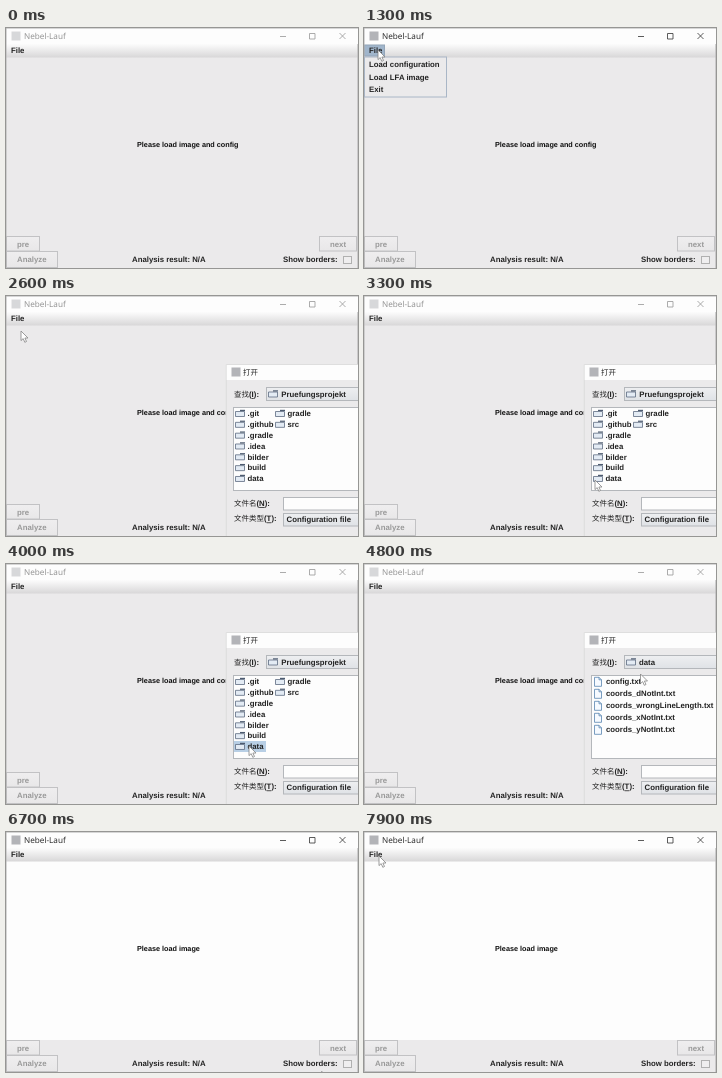
An HTML page that plays this animation: 352 by 240 pixels, repeating every 8000 ms.

```html
<!DOCTYPE html>
<html lang="en">
<head>
<meta charset="utf-8">
<title>Nebel-Lauf</title>
<style>
  html, body { margin: 0; width: 100%; height: 100%; overflow: hidden; background: #ebeaeb; }
  svg { display: block; width: 100vw; height: 100vh; }
  text { font: bold 7.8px "Liberation Sans", "Noto Sans CJK SC", "Noto Sans CJK", sans-serif;
         fill: #222; text-rendering: geometricPrecision; white-space: pre; }
  .title { font: 8.2px "Open Sans", "Noto Sans", sans-serif; }
  .label { font-size: 7.25px; fill: #111; }
  .off { fill: #999; }
  .plain { font-weight: normal; }
  .cjk { font: 500 7.5px "Noto Sans CJK SC", "Noto Sans CJK", sans-serif; }
</style>
</head>
<body>
<svg id="stage" viewBox="0 0 352 240" xmlns="http://www.w3.org/2000/svg"></svg>
<script>
const LOOP = 8000, STEP = 100;
const FACE = '#ebeaeb', BORDER = '#b4b7bb', SELECT = '#a0b5cb', ROW = '#b8cfe5';

const rect = (x, y, w, h, fill, stroke = 'none', extra = '') =>
  `<rect x="${x}" y="${y}" width="${w}" height="${h}" fill="${fill}" stroke="${stroke}" ${extra}/>`;
const text = (x, y, s, cls = '', extra = '') => `<text x="${x}" y="${y}" class="${cls}" ${extra}>${s}</text>`;
const path = (d, fill, stroke, width = 0.8) =>
  `<path d="${d}" fill="${fill}" stroke="${stroke}" stroke-width="${width}"/>`;
const group = (id, body) => `<g id="${id}">${body}</g>`;
const box = (x, y, w, h, fill, stroke = BORDER, extra = '') =>
  rect(x + .5, y + .5, w - 1, h - 1, fill, stroke, extra);

const folder = (x, y) =>
  path(`M${x + 1.5} ${y + 2.5}h9v5h-9z`, '#e3ebf4', '#5d6b80') +
  path(`M${x + 6} ${y + 1.4}h5`, 'none', '#4d5b70', 1.2);
const page = (x, y) =>
  path(`M${x + .5} ${y + .5}h4.5l2.5 2.5v6.5h-7z`, '#f6faff', '#5a86b0') +
  path(`M${x + 5} ${y + .5}v2.5h2.5`, 'none', '#5a86b0');
const button = (x, y, w, h, tx, ty, s) => box(x, y, w, h, 'url(#btn)', '#c2c2c4') + text(tx, ty, s, 'off');
const appIcon = (x, y) => rect(x, y, 9, 9, '#b3b4b8');
const caption = (y, cjk, key) =>
  `<text x="228" y="${y}"><tspan class="cjk">${cjk}</tspan>(<tspan text-decoration="underline">${key}</tspan>):</text>`;

const fade = (id, a, b) => `<linearGradient id="${id}" x2="0" y2="1">
  <stop stop-color="${a}"/><stop offset="1" stop-color="${b}"/></linearGradient>`;

const titleInk = appIcon(5.5, 3.5) + text(18, 11, 'Nebel-Lauf', 'title') +
  path('M274 8.5h6M303.5 5.5h5.5v5.5h-5.5zM333.5 5l6 6m0-6l-6 6', 'none', '#333', .8);

const mainWindow =
  rect(0, 16, 352, 224, FACE) + rect(0, 29, 352, 179, '#fdfdfd', 'none', 'id="canvas"') +
  rect(0, 0, 352, 16, '#fdfdfd') + group('titleInk', titleInk) +
  rect(0, 16, 352, 13.5, 'url(#bar)') +
  box(0, 16.5, 21, 12, SELECT, '#93a5b8', 'id="fileSel"') +
  text(5, 25, 'File') +
  text(131, 119.3, '', 'label', 'id="label"') +
  button(0, 208, 34, 15.5, 11, 218.5, 'pre') +
  button(313, 208, 38, 15.5, 324, 218.5, 'next') +
  button(0, 223, 52, 17, 11, 234.3, 'Analyze') +
  text(126, 234.2, 'Analysis result: N/A') + text(277, 234.2, 'Show borders:') +
  box(337, 228, 9, 8, '#efeeef', '#b0b0b0') +
  path('M.3 0v240M351.6 16v224M0 .3h352', 'none', '#b8b8b8', .7);

const menu = box(0, 28.5, 83, 41, FACE, '#a9b6c6') +
  rect(1, 30, 81, 12, SELECT, 'none', 'id="menuSel"') +
  ['Load configuration', 'Load LFA image', 'Exit'].map((s, i) => text(5, 39 + 12.5 * i, s)).join('');

const folders = ['.git', '.github', '.gradle', '.idea', 'bilder', 'build', 'data', 'gradle', 'src'];
const files = ['config', 'coords_dNotInt', 'coords_wrongLineLength', 'coords_xNotInt', 'coords_yNotInt'];

const folderView = folder(261, 93.5) + text(275.3, 101, 'Pruefungsprojekt') +
  rect(228, 177, 32, 11, ROW, 'none', 'id="dirSel"') +
  folders.map((s, i) => {
    const x = i < 7 ? 228 : 268, y = 113 + 10.83 * (i % 7);
    return folder(x, y) + text(x + 13.5, y + 7.3, s);
  }).join('');

const fileView = folder(261, 93.5) + text(275, 101, 'data') +
  rect(228, 112, 52, 11.5, ROW, 'none', 'id="fileRow"') +
  files.map((s, i) => page(230, 112.8 + 12 * i) + text(242, 120.3 + 12 * i, s + '.txt')).join('');

const dialog =
  rect(220, 68.5, 132, 172, FACE) + rect(220, 68.5, 132, 15.5, '#fdfdfd') +
  path('M220.3 240V68.5H352', 'none', '#d6d6d6', .7) +
  appIcon(225.5, 71.5) + text(237, 79, '打开', 'cjk') +
  caption(101, '查找', 'I') + box(260, 91, 100, 14, 'url(#combo)') +
  box(227, 111, 130, 84, '#fdfdfd') +
  group('folderView', folderView) + group('fileView', fileView) +
  caption(210.2, '文件名', 'N') + box(277, 201, 80, 13.5, '#fdfdfd') +
  text(278.5, 209.8, 'config.txt', 'plain', 'id="fileName"') +
  caption(225.4, '文件类型', 'T') + box(277, 217, 80, 13.5, 'url(#combo)') +
  text(280.5, 226, 'Configuration file');

const stage = document.getElementById('stage');
stage.innerHTML =
  `<defs>${fade('bar', '#fcfcfc', '#d8d7d8')}${fade('btn', '#efeeef', '#e8e7e8')}${fade('combo', '#eeeff1', '#dfe2e6')}</defs>` +
  mainWindow + group('menu', menu) + group('dialog', dialog) +
  group('cursor', path('M0 0v9.6l2.2-2 1.6 3.7 1.7-.8-1.6-3.5h3.1z', '#fff', '#858585', .8));

const el = Object.fromEntries([...stage.querySelectorAll('[id]')].map(n => [n.id, n]));

// time, x, y
const route = [
  [100, -10, 60], [700, 12, 25], [900, 14, 22], [1300, 14, 22], [1600, 15, 27], [2100, 15, 35],
  [2600, 15, 35], [3300, 231, 184], [3600, 243, 185], [4200, 243, 181], [4800, 276.5, 110],
  [5000, 276.5, 110], [5200, 264, 116], [5400, 264, 116], [5700, 285, 196], [5900, 318, 250],
  [6600, 330, 250], [7300, 72, 57], [7800, 15, 24], [8000, 15, 24]
];

function cursorAt(t) {
  const i = route.findIndex(p => p[0] > t);
  if (i < 1) return route[0].slice(1);
  const [t0, x0, y0] = route[i - 1], [t1, x1, y1] = route[i];
  const u = (t - t0) / (t1 - t0), k = u * u * (3 - 2 * u);
  return [x0 + (x1 - x0) * k, y0 + (y1 - y0) * k];
}

function render(time) {
  const t = Math.floor(time % LOOP / STEP) * STEP;
  const within = (a, b) => t >= a && t < b;
  const show = (name, on) => { el[name].style.display = on ? '' : 'none'; };
  const active = within(1300, 2600) || t >= 6600;
  el.titleInk.style.opacity = active ? 1 : .5;
  el.label.textContent = t >= 6600 ? 'Please load image' : 'Please load image and config';
  show('canvas', t >= 6600);
  show('fileSel', within(1300, 2500));
  show('menu', within(1300, 2500));
  show('menuSel', t >= 1800);
  show('dialog', within(2600, 6600));
  show('folderView', t < 4200);
  show('dirSel', t >= 3600);
  show('fileView', t >= 4200);
  show('fileRow', t >= 5200);
  show('fileName', t >= 5200);
  const [x, y] = cursorAt(t);
  el.cursor.setAttribute('transform', `translate(${x} ${y})`);
}

const start = performance.now();
function tick() {
  render(performance.now() - start);
  requestAnimationFrame(tick);
}
tick();
</script>
</body>
</html>
```
